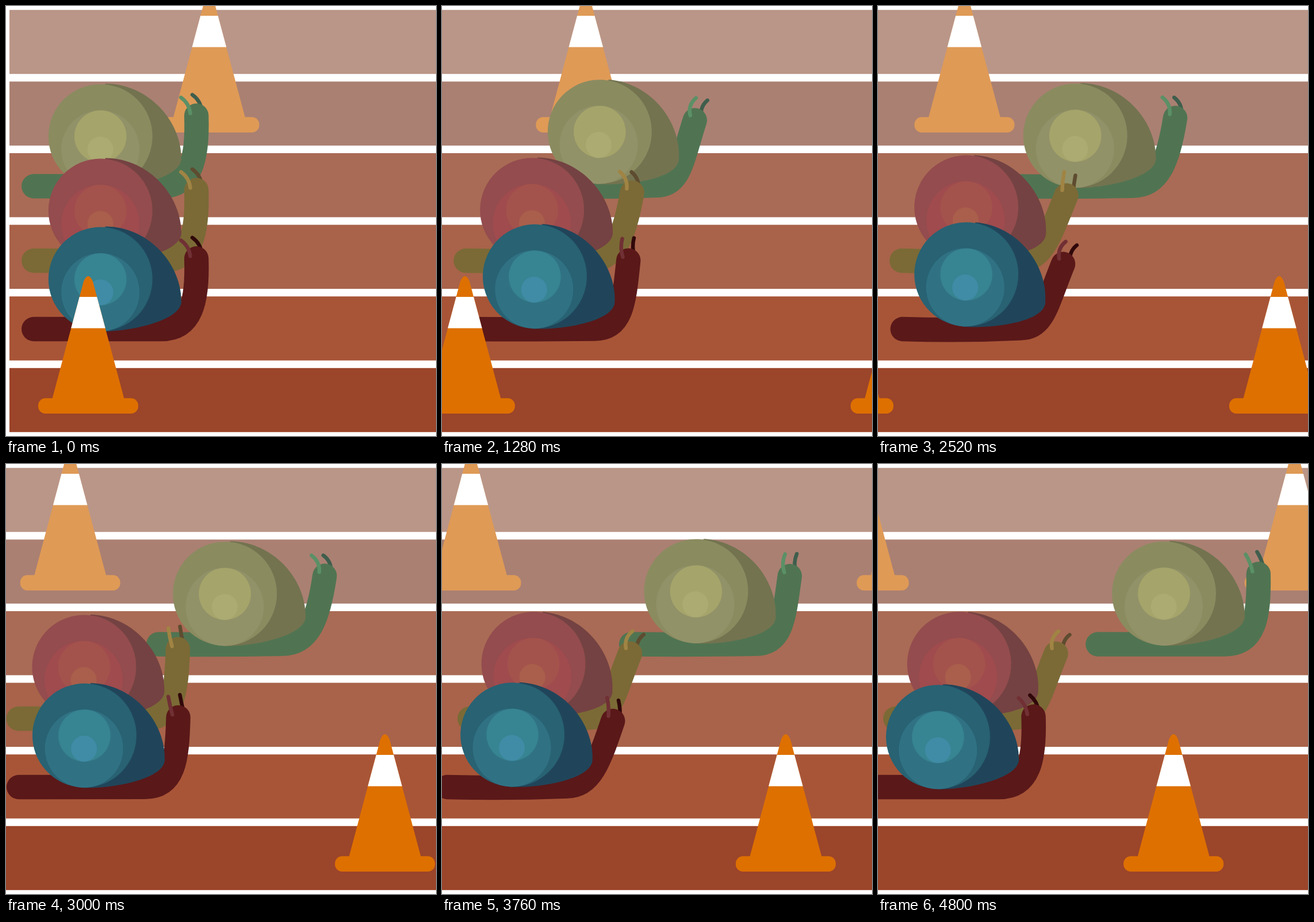
Animation of 748 by 748 pixels, one loop 4840 ms. Source, as an HTML page with a canvas:

```html
<!DOCTYPE html>
<html lang="en">
<head>
<meta charset="utf-8">
<title>Snail race</title>
<style>
html, body { margin: 0; width: 100%; height: 100%; overflow: hidden; background: #fff; }
canvas { display: block; }
</style>
</head>
<body>
<canvas id="stage" width="748" height="748"></canvas>
<script>
const ctx = document.getElementById('stage').getContext('2d');
const SIZE = 748, LOOP = 4840, STEP = 40;
const SCROLL = 0.0806;      // track speed in px per ms
const CONE_GAP = 758;
const TAU = Math.PI * 2, DEG = Math.PI / 180;

const LANES = ['#ba9688', '#aa8072', '#a96b55', '#a8634a', '#a85537', '#9b452a'];

// drift: slow horizontal offset of each racer at the shared key times
const KEY_TIMES = [0, 680, 1280, 2040, 3000, 3760, 4800];
const SNAILS = [
  { y: -248.5, cycles: 10, drift: [-0.6, 47, 92, 136, 212, 266, 330],
    body: '#507452', shell: '#8b8b60', back: '#737350',
    rings: ['#929269', '#a5a46a', '#abab72'], feelers: ['#5b9066', '#3f5e4d'] },
  { y: -119, cycles: 4.6, drift: [-0.6, -2, -13, -18, -35, -25, -43],
    body: '#7b6a36', shell: '#944c4e', back: '#744242',
    rings: ['#a04b4e', '#a4534c', '#a95f4b'], feelers: ['#a08444', '#5e4c30'] },
  { y: 0, cycles: 3, drift: [-0.6, -5, -13, -27, -34, -54, -61],
    body: '#5a1819', shell: '#286273', back: '#20455a',
    rings: ['#307284', '#378492', '#408ba5'], feelers: ['#703034', '#30080a'] }
];

const wave = (phase, shift) => Math.cos(TAU * (phase - shift));
const swell = (phase, shift) => 1 - wave(phase, shift);

function keyed(values, t) {
  let i = 0;
  while (i < KEY_TIMES.length - 2 && t > KEY_TIMES[i + 1]) i++;
  const k = (t - KEY_TIMES[i]) / (KEY_TIMES[i + 1] - KEY_TIMES[i]);
  return values[i] + (values[i + 1] - values[i]) * k;
}

function disc(x, y, r, color) {
  ctx.fillStyle = color;
  ctx.beginPath();
  ctx.arc(x, y, r, 0, TAU);
  ctx.fill();
}

function drawTrack(t) {
  const left = Math.max(0, 6 - SCROLL * t);
  LANES.forEach((color, i) => {
    ctx.fillStyle = color;
    ctx.fillRect(left, 6.8 + i * 124.6, SIZE - left, 111.4);
  });
}

function drawCone(x, y, color) {
  ctx.save();
  ctx.translate(x, y);
  ctx.fillStyle = color;
  ctx.beginPath();
  ctx.moveTo(-62.5, 683);
  ctx.lineTo(-8, 479);
  ctx.quadraticCurveTo(0, 461, 8, 479);
  ctx.lineTo(62.5, 683);
  ctx.fill();
  ctx.beginPath();
  ctx.roundRect(-87, 682.3, 174, 26.7, 12.5);
  ctx.fill();
  ctx.fillStyle = '#fff';
  ctx.beginPath();
  ctx.moveTo(-15.2, 506);
  ctx.lineTo(15.2, 506);
  ctx.lineTo(29.8, 560.5);
  ctx.lineTo(-29.8, 560.5);
  ctx.fill();
  ctx.restore();
}

function drawCones(x, y, color, t) {
  for (let k = 0; k < 2; k++) drawCone(x - SCROLL * t + k * CONE_GAP, y, color);
}

function drawFeeler(head, turn, offset, phase, color) {
  const c = Math.cos(turn), s = Math.sin(turn);
  const x = head.x + offset[0] * c - offset[1] * s;
  const y = head.y + offset[0] * s + offset[1] * c;
  const angle = (-6 - 27 * wave(phase, 0.07)) * DEG;
  const bend = 10 * wave(phase, 0.12);
  const dx = Math.sin(angle), dy = -Math.cos(angle), length = 32;
  ctx.strokeStyle = color;
  ctx.lineWidth = 6.5;
  ctx.beginPath();
  ctx.moveTo(x, y);
  ctx.quadraticCurveTo(
    x + dx * length / 2 - dy * bend, y + dy * length / 2 + dx * bend,
    x + dx * length, y + dy * length);
  ctx.stroke();
}

function drawBody(head, lean, color) {
  const a = lean * DEG;
  ctx.strokeStyle = color;
  ctx.lineWidth = 42.4;
  ctx.beginPath();
  ctx.moveTo(48.2, 562);
  ctx.quadraticCurveTo(150, 562 + 0.15 * lean, 268 - 0.6 * lean, 562 - 0.08 * lean);
  ctx.bezierCurveTo(
    320 - 1.2 * lean, 562 - 0.08 * lean,
    head.x - 75 * Math.sin(a), head.y + 75 * Math.cos(a),
    head.x, head.y);
  ctx.stroke();
}

function drawShell(x, y, turn, snail) {
  ctx.save();
  ctx.translate(x, y);
  ctx.rotate(turn);
  ctx.fillStyle = snail.back;
  ctx.beginPath();
  ctx.moveTo(8, -91.5);
  ctx.bezierCurveTo(85, -91.5, 141, -25, 141, 38);
  ctx.bezierCurveTo(141, 72, 50, 91.5, 0, 91);
  ctx.fill();
  disc(0, 0, 90.5, snail.shell);
  disc(0, 22.8, 68, snail.rings[0]);
  disc(0, 0.3, 45.3, snail.rings[1]);
  disc(0, 23, 22.6, snail.rings[2]);
  ctx.restore();
}

function drawSnail(snail, t) {
  const phase = snail.cycles * t / LOOP;
  const rise = 4.4 * swell(phase, 0.07);
  const lean = 13 * swell(phase, -0.02) - 2;
  const push = 12.5 * swell(phase, 0.05);
  const slip = -0.6 * rise;
  const head = {
    x: 332.3 + slip + 6 * Math.sin(TAU * (phase - 0.05)) + 1,
    y: 439.3 + 5 * swell(phase, -0.01)
  };
  const turn = 1.3 * lean * DEG;

  ctx.save();
  ctx.translate(keyed(snail.drift, t) + push, snail.y);
  ctx.lineCap = 'round';
  drawFeeler(head, turn, [9.5, -8.5], phase, snail.feelers[1]);
  drawBody(head, lean, snail.body);
  drawFeeler(head, turn, [-10.5, -4.5], phase, snail.feelers[0]);
  drawShell(164.5 + slip, 475.5 - rise, rise * 0.55 * DEG, snail);
  ctx.restore();
}

function draw(t) {
  ctx.fillStyle = '#fff';
  ctx.fillRect(0, 0, SIZE, SIZE);
  drawTrack(t);
  drawCones(353.5, -489, '#df9a56', t);
  SNAILS.forEach(snail => drawSnail(snail, t));
  drawCones(143, 0, '#de7000', t);
}

const start = performance.now();
function tick() {
  const t = (performance.now() - start) % LOOP;
  draw(Math.floor(t / STEP) * STEP);
  requestAnimationFrame(tick);
}
tick();
</script>
</body>
</html>
```
